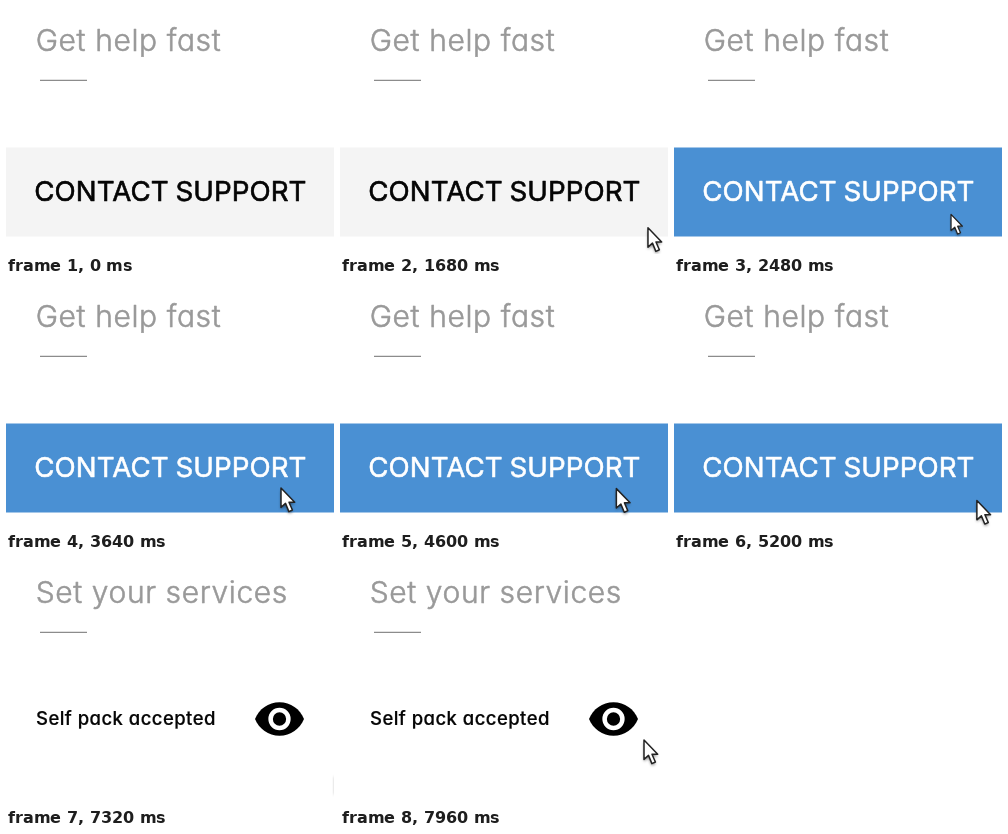
An HTML page for the animation above (8 s loop, 328 by 248 pixels).

```html
<!DOCTYPE html>
<html lang="en">
<head>
<meta charset="utf-8">
<title>Help and services</title>
<style>
  html, body { margin: 0; width: 100%; height: 100%; overflow: hidden; background: #fff; }
  svg { display: block; width: 328px; height: 248px; }
  text { font-family: Inter, Lato, sans-serif; font-feature-settings: "cv11"; stroke-linejoin: round; }
  .head { font-size: 30px; font-weight: 300; letter-spacing: .6px; fill: #999; stroke: #999; stroke-width: .6px; }
  .label { font-size: 27.7px; font-weight: 400; letter-spacing: .05px; word-spacing: -1px; stroke-width: .6px; }
  .row { font-size: 18.5px; font-weight: 500; letter-spacing: .45px; fill: #050505; stroke: #050505; stroke-width: .2px; }
</style>
</head>
<body>
<svg viewBox="0 0 328 248">
  <defs>
    <filter id="blur" x="-50%" y="-50%" width="200%" height="200%">
      <feGaussianBlur stdDeviation="1.5"/>
    </filter>
    <path id="arrow" d="M0 0V19.4L4.5 15.4L7.9 23.6L11.4 22L8 14.2H13.7Z"/>
  </defs>
  <rect width="328" height="248" fill="#fff"/>
  <path d="M34 74.4H81" stroke="#8c8c8c" stroke-width="1.1"/>
  <g id="help">
    <text class="head" x="29.7" y="45">Get help fast</text>
    <rect id="button" y="141.5" width="328" height="89"/>
    <text id="label" class="label" x="28.3" y="195">CONTACT SUPPORT</text>
  </g>
  <g id="services">
    <text class="head" x="29.7" y="45">Set your services</text>
    <text class="row" x="30" y="167">Self pack accepted</text>
    <path d="M249 161C252.9 151.2 262.4 144.3 273.5 144.3S294.1 151.2 298 161C294.1 170.8 284.6 177.7 273.5 177.7S252.9 170.8 249 161Z"/>
    <circle cx="273.5" cy="161" r="8.9" fill="none" stroke="#fff" stroke-width="4.5"/>
  </g>
  <g id="cursor">
    <use href="#arrow" y="2" opacity=".5" filter="url(#blur)"/>
    <use href="#arrow" fill="#fff" stroke="#222" stroke-width="1.5" stroke-linejoin="round"/>
  </g>
</svg>
<script>
  const LOOP = 8000, CUT = 6080;
  const $ = id => document.getElementById(id);
  const clamp = v => Math.min(1, Math.max(0, v));
  const part = (t, from, to) => clamp((t - from) / (to - from));
  const mix = (a, b, k) => a + (b - a) * k;
  const between = (a, b, k) => a.map((v, i) => mix(v, b[i], k));
  const blend = (a, b, k) => `rgb(${between(a, b, k).map(Math.round)})`;

  const rest = [275, 206];

  function cursorAt(t) {
    if (t < 1240 || (t >= 5840 && t < 7320)) return null;
    if (t < 4570) return between([331.5, 233], rest, 1 - (1 - part(t, 1240, 2540)) ** 1.3);
    if (t < CUT) return between(rest, [332, 231.5], part(t, 4570, 5860));
    return between([329, 216], [304, 182], part(t, 7320, 7960));
  }

  // The pointer shrinks around its middle while it presses.
  const pressAt = t => Math.sin(Math.PI * part(t, 2200, 2760));

  function draw(t) {
    const first = t < CUT;
    $("help").style.display = first ? "" : "none";
    $("services").style.display = first ? "none" : "";

    const hover = part(t, 2080, 2320);
    const ink = blend([5, 5, 5], [255, 255, 255], hover);
    $("button").setAttribute("fill", blend([244, 244, 244], [74, 144, 211], hover));
    $("label").setAttribute("fill", ink);
    $("label").setAttribute("stroke", ink);

    const tip = cursorAt(t);
    $("cursor").style.display = tip ? "" : "none";
    if (tip) {
      const size = 1 - 0.17 * pressAt(t);
      $("cursor").setAttribute("transform",
        `translate(${tip}) translate(6 11.5) scale(${size}) translate(-6 -11.5)`);
    }
  }

  const start = performance.now();
  function tick() {
    draw((performance.now() - start) % LOOP);
    requestAnimationFrame(tick);
  }
  draw(0);
  tick();
</script>
</body>
</html>
```
